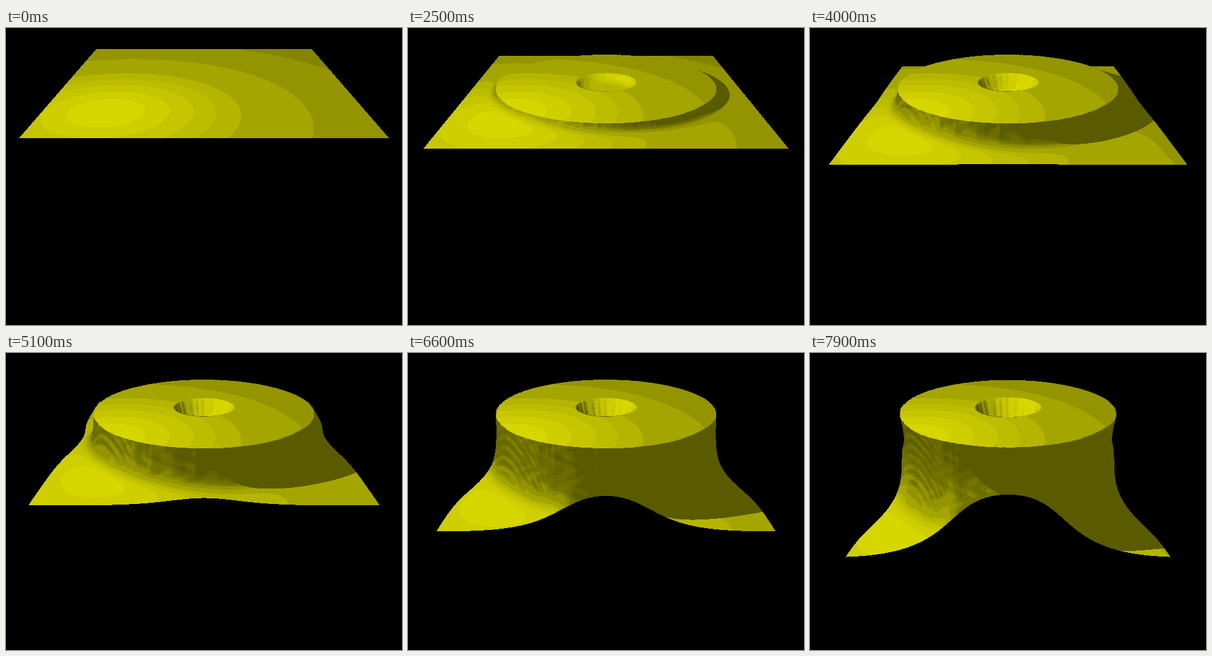
An HTML page with a canvas that plays this animation: 640x480 px, repeating every 8000 ms.

```html
<!DOCTYPE html>
<html lang="en">
<head>
<meta charset="utf-8">
<title>Falling cloth</title>
<style>
html, body { margin: 0; width: 100%; height: 100%; overflow: hidden; background: #000; }
canvas { display: block; }
</style>
</head>
<body>
<canvas id="stage" width="640" height="480"></canvas>
<script>
const W = 640, H = 480, LOOP = 8000, STEP = 100;
const ctx = document.getElementById('stage').getContext('2d');
const img = ctx.createImageData(W, H);
const out = new Uint32Array(img.data.buffer);

// Camera: focal length, pitch, and the cloth centre in view space
const FOCAL = 725, SIN = 0.489, COS = 0.8722, DEPTH = 3.296, RISE = 0.6956;
const LIGHT = { x: -0.602, y: 0.6, z: 0.612 };
const DISC = 0.792, HOLE = 0.215, GRAVITY = 0.0101;

const LIMITS = [0.03, 0.09, 0.16, 0.24, 0.309, 0.433, 0.587, 0.665, 0.745, 0.839, 0.93];
const TONES = [90, 99, 107, 115, 132, 148, 165, 181, 189, 198, 206, 214];

// Polar mesh: hole rings, two flat rings on the disc, then the hanging part
const SPOKES = 480, IN = 14, OUT = 36;
const RINGS = IN + 1 + 2 + OUT + 1;
const COUNT = SPOKES * RINGS;
const buf = n => new Float32Array(n);
const px = buf(COUNT), py = buf(COUNT), pz = buf(COUNT);
const nx = buf(COUNT), ny = buf(COUNT), nz = buf(COUNT);
const sx = buf(COUNT), sy = buf(COUNT), inv = buf(COUNT);
const zBuf = buf(W * H), bx = buf(W * H), by = buf(W * H), bz = buf(W * H);

const clamp = v => Math.max(0, Math.min(1, v));
const softMin = (a, b) => a / Math.pow(1 + Math.pow(a / b, 8), 1 / 8);
const settle = (x, w, len) => (1 - Math.exp(-x / w)) / (1 - Math.exp(-len / w));
const jag = i => {
  const v = Math.sin((i >> 1) * 12.9898) * 43758.5453;
  return v - Math.floor(v) - 0.5;
};

function place(k, r, y, c, s) {
  const x = r * c, z = r * s;
  px[k] = x; py[k] = y; pz[k] = z;
  const d = DEPTH - y * SIN - z * COS;
  sx[k] = W / 2 + FOCAL * x / d;
  sy[k] = H / 2 - FOCAL * (RISE + y * COS - z * SIN) / d;
  inv[k] = 1 / d;
}

function shape(t) {
  const fall = GRAVITY * t * t;
  const late = Math.pow(clamp((t - 6.2) / 1.7), 2);
  const shrink = 0.014 * late, disc = DISC - shrink, hole = HOLE + 0.02 * late;
  const sink = softMin(fall, 0.3), dip = 0.03 + 0.1 * sink;
  const steep = 0.025 + 0.02 * fall;
  for (let i = 0; i < SPOKES; i++) {
    const a = i / SPOKES * Math.PI * 2, c = Math.cos(a), s = Math.sin(a);
    const rough = 0.005 * jag(i) * clamp(fall * 20);
    let k = i * RINGS;
    for (let j = 0; j <= IN; j++) {
      const r = Math.max(0.001, hole * j / IN);
      place(k++, r, -sink * settle(hole - r, dip, hole), c, s);
    }
    place(k++, hole + 0.012, 0, c, s);
    place(k++, disc - 0.012, 0, c, s);

    // The overhang falls freely until its own length holds it back
    const slack = 1 / Math.max(Math.abs(c), Math.abs(s)) - DISC;
    const reach = (1.45 + 1.8 * (slack - 0.21)) * slack;
    const drop = softMin(fall, reach);
    const spread = 1 / (1 + Math.pow(fall / reach, 5));
    const len = Math.max(0.008, slack * spread);
    for (let j = 0; j <= OUT; j++) {
      const x = len * Math.pow(j / OUT, 1.9);
      const g = 0.88 * settle(x, steep, len) + 0.12 * settle(x, 0.2, len);
      const pinch = 0.022 * late * Math.sin(Math.PI * g);
      const r = disc + x + shrink * x / len - pinch;
      place(k++, r + rough * (1 - g) * (1 - g), -drop * g, c, s);
    }
  }
  for (let i = 0; i < SPOKES; i++) {
    const prev = (i + SPOKES - 1) % SPOKES * RINGS, next = (i + 1) % SPOKES * RINGS;
    for (let j = 0; j < RINGS; j++) {
      const k = i * RINGS + j;
      const p = prev + j, q = next + j;
      const lo = j ? k - 1 : k, hi = j < RINGS - 1 ? k + 1 : k;
      const ax = px[q] - px[p], ay = py[q] - py[p], az = pz[q] - pz[p];
      const ex = px[hi] - px[lo], ey = py[hi] - py[lo], ez = pz[hi] - pz[lo];
      const x = ay * ez - az * ey, y = az * ex - ax * ez, z = ax * ey - ay * ex;
      const m = Math.hypot(x, y, z);
      if (j === 0 || m < 1e-12) { nx[k] = 0; ny[k] = 1; nz[k] = 0; }
      else { nx[k] = x / m; ny[k] = y / m; nz[k] = z / m; }
    }
  }
}

function triangle(a, b, c) {
  const x0 = sx[a], y0 = sy[a], x1 = sx[b], y1 = sy[b], x2 = sx[c], y2 = sy[c];
  const area = (x1 - x0) * (y2 - y0) - (x2 - x0) * (y1 - y0);
  if (Math.abs(area) < 1e-7) return;
  const left = Math.max(0, Math.ceil(Math.min(x0, x1, x2) - 0.5));
  const right = Math.min(W - 1, Math.floor(Math.max(x0, x1, x2) - 0.5));
  const top = Math.max(0, Math.ceil(Math.min(y0, y1, y2) - 0.5));
  const bottom = Math.min(H - 1, Math.floor(Math.max(y0, y1, y2) - 0.5));
  for (let y = top; y <= bottom; y++) {
    const v = y + 0.5;
    for (let x = left; x <= right; x++) {
      const u = x + 0.5;
      const w1 = ((u - x0) * (y2 - y0) - (x2 - x0) * (v - y0)) / area;
      const w2 = ((x1 - x0) * (v - y0) - (u - x0) * (y1 - y0)) / area;
      const w0 = 1 - w1 - w2;
      if (w0 < -1e-4 || w1 < -1e-4 || w2 < -1e-4) continue;
      const d = w0 * inv[a] + w1 * inv[b] + w2 * inv[c], k = y * W + x;
      if (d <= zBuf[k]) continue;
      zBuf[k] = d;
      bx[k] = w0 * nx[a] + w1 * nx[b] + w2 * nx[c];
      by[k] = w0 * ny[a] + w1 * ny[b] + w2 * ny[c];
      bz[k] = w0 * nz[a] + w1 * nz[b] + w2 * nz[c];
    }
  }
}

function shadowed(x, y, z) {
  if (y > -0.006) return false;
  const f = -y / (LIGHT.y - y);
  const r = Math.hypot(x + (LIGHT.x - x) * f, z + (LIGHT.z - z) * f);
  return Math.hypot(x, z) < 0.5 ? r > HOLE + 0.025 : r < DISC - 0.02;
}

function tone(k, col, row) {
  const d = 1 / zBuf[k];
  const back = DEPTH - d, up = (H / 2 - row - 0.5) * d / FOCAL - RISE;
  const x = (col + 0.5 - W / 2) * d / FOCAL;
  const y = SIN * back + COS * up, z = COS * back - SIN * up;
  if (shadowed(x, y, z)) return TONES[0];
  let ux = bx[k], uy = by[k], uz = bz[k];
  const m = Math.hypot(ux, uy, uz) || 1;
  ux /= m; uy /= m; uz /= m;

  // Creases on the steep parts
  const wall = clamp((0.7 - uy) / 0.4);
  if (wall > 0) {
    const a = Math.atan2(z, x), r = Math.hypot(x, z);
    let side;
    if (r > 0.5) {
      const off = a - 2.5;
      const ring = Math.sin((y + 1.5 * off * off) * 85) * Math.exp(-off * off * 8);
      const fold = Math.sin(a * 29 + Math.sin(y * 31) * 2) * Math.sin(y * 38 + a * 9);
      uy += wall * (0.08 * ring + 0.04 * fold);
      side = wall * 0.1 * fold;
    } else {
      side = wall * 0.18 * Math.sin(a * 23 + Math.sin(a * 7));
    }
    ux -= side * z / r;
    uz += side * x / r;
  }
  const lx = LIGHT.x - x, ly = LIGHT.y - y, lz = LIGHT.z - z;
  const lit = (ux * lx + uy * ly + uz * lz) / Math.hypot(lx, ly, lz) / Math.hypot(ux, uy, uz);
  let n = 0;
  while (n < LIMITS.length && lit > LIMITS[n]) n++;
  return TONES[n];
}

function draw(t) {
  shape(t);
  zBuf.fill(0);
  for (let i = 0; i < SPOKES; i++) {
    const a = i * RINGS, b = (i + 1) % SPOKES * RINGS;
    for (let j = 0; j < RINGS - 1; j++) {
      triangle(a + j, a + j + 1, b + j);
      triangle(b + j, a + j + 1, b + j + 1);
    }
  }
  for (let row = 0, k = 0; row < H; row++) {
    for (let col = 0; col < W; col++, k++) {
      const c = zBuf[k] ? tone(k, col, row) : 0;
      out[k] = (0xff000000 | c << 8 | c) >>> 0;
    }
  }
  ctx.putImageData(img, 0, 0);
}

const start = performance.now();
let shown = -1;
function tick() {
  const step = Math.floor((performance.now() - start) % LOOP / STEP);
  if (step !== shown) {
    shown = step;
    draw(step * STEP / 1000);
  }
  requestAnimationFrame(tick);
}
tick();
</script>
</body>
</html>
```
